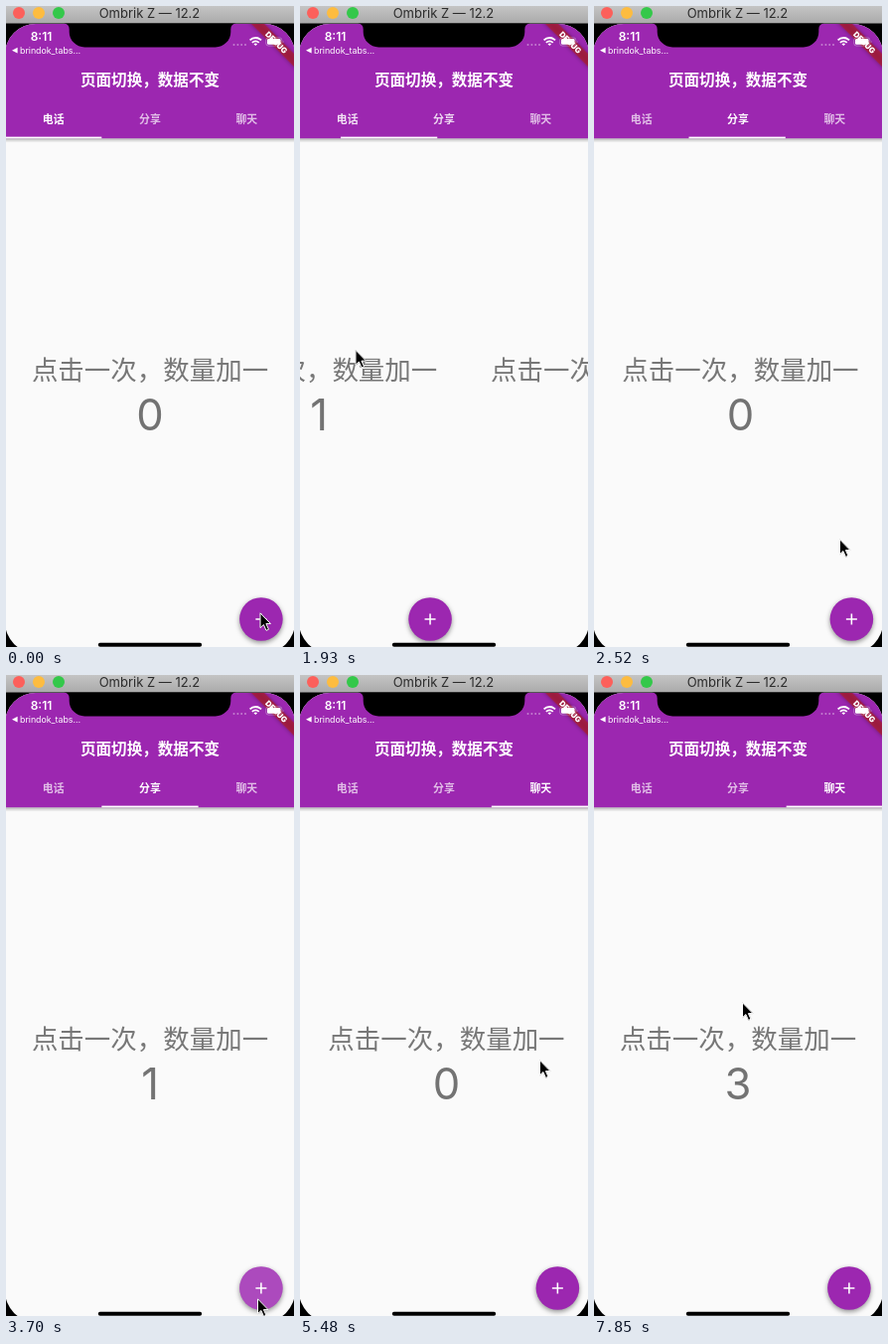
These frames come from a looping animation (290x645 px, 7.99 s). An HTML page:

```html
<!DOCTYPE html>
<html lang="zh">
<head>
<meta charset="utf-8">
<title>Tabs with kept counters</title>
<style>
  html, body { margin: 0; width: 100%; height: 100%; overflow: hidden; background: #000; }
  svg { display: block; width: 100%; height: 100%; }
  text { font-family: Inter, "Noto Sans CJK SC", "Noto Sans CJK", sans-serif; text-anchor: middle; }
  .cjk { font-family: "Noto Sans CJK SC", "Noto Sans CJK", sans-serif; }
  .white { fill: #fff; }
  .bar { font-size: 15.57px; font-weight: 700; }
  .tab { font-size: 10.9px; font-weight: 700; }
  .hint { font-size: 26.48px; fill: #777; }
  .count { font-size: 43.6px; fill: #737373; }
  .fab { filter: drop-shadow(0 2.6px 2.8px rgba(0, 0, 0, .42)); }
</style>
</head>
<body>
<svg viewBox="0 0 290 645">
  <defs>
    <linearGradient id="chrome" x2="0" y2="1">
      <stop stop-color="#c4c4c4"/><stop offset="1" stop-color="#aaa"/>
    </linearGradient>
    <linearGradient id="shade" x2="0" y2="1">
      <stop stop-opacity=".3"/><stop offset=".5" stop-opacity=".12"/><stop offset="1" stop-opacity="0"/>
    </linearGradient>
    <clipPath id="screen"><rect x="-1" y="18" width="292" height="633" rx="31"/></clipPath>
    <g id="button">
      <circle class="fab" cx="256.9" cy="617" r="21.8" fill="#9c27b0"/>
      <path d="M251.4 617h11M256.9 611.5v11" stroke="#fff" stroke-width="1.56"/>
    </g>
  </defs>

  <rect width="290" height="17.5" fill="url(#chrome)"/>
  <circle cx="13" cy="7" r="6" fill="#fc605b"/>
  <circle cx="33" cy="7" r="6" fill="#fdbc40"/>
  <circle cx="53" cy="7" r="6" fill="#34c84a"/>
  <text x="144.5" y="12" font-size="13" fill="#2c2c2c">Ombrik Z — 12.2</text>

  <g clip-path="url(#screen)">
    <rect y="18" width="290" height="633" fill="#fafafa"/>
    <g id="pages"></g>

    <rect y="133.2" width="290" height="4.5" fill="url(#shade)"/>
    <rect y="18" width="290" height="115.2" fill="#9c27b0"/>
    <text class="cjk white bar" x="145" y="79.8">页面切换，数据不变</text>
    <rect id="ripple" x="193.7" y="96" width="97.3" height="37.2" fill="#fff" opacity="0"/>
    <g id="tabs"></g>
    <rect id="line" y="131.6" width="97.3" height="1.6" fill="#fff"/>

    <g transform="translate(291 18) rotate(45)">
      <rect x="-45" y="21.8" width="90" height="9.34" fill="#b71c1c" fill-opacity=".63"
            style="filter: drop-shadow(0 0 2px rgba(0, 0, 0, .5))"/>
      <text class="white" y="29.3" font-size="7.9" font-weight="900">DEBUG</text>
    </g>

    <text class="white" x="35.5" y="34.6" font-size="12" font-weight="600">8:11</text>
    <path d="M6 44.7l5.6-2.9v5.8z" fill="#fff"/>
    <text class="white" x="14" y="47.9" font-size="8.8" style="text-anchor: start">brindok_tabs…</text>
    <path d="M229.5 39h.01M233.4 39h.01M237.2 39h.01M241 39h.01"
          stroke="#fff" stroke-opacity=".4" stroke-width="2" stroke-linecap="round"/>
    <g fill="none" stroke="#fff" stroke-width="1.8">
      <path d="M245.6 34.4a8 8 0 0 1 11.4 0M247.9 36.8a4.8 4.8 0 0 1 6.8 0"/>
      <path d="M249.5 38.3a2.6 2.6 0 0 1 3.6 0l-1.8 1.8z" fill="#fff" stroke="none"/>
    </g>
    <rect x="261.8" y="31.8" width="16" height="8.2" rx="2.4" fill="none" stroke="#fff" stroke-opacity=".4" stroke-width=".8"/>
    <rect x="263" y="33" width="13.6" height="5.8" rx="1.4" fill="#fff"/>
    <path d="M278.9 34.5q1.4 1.4 0 2.8z" fill="#fff" fill-opacity=".45"/>
  </g>

  <path d="M58.2 17.5q5.5.5 5.5 6v2.4a15.5 15.5 0 0 0 15.5 15.5h131.6a15.5 15.5 0 0 0 15.5-15.5v-2.4q0-5.5 5.5-6z"/>
  <rect x="92.8" y="640.8" width="104.4" height="3.9" rx="1.95"/>

  <path id="cursor" d="M.5 .8v14.9l3.4-3.2 2.6 5.9 2.5-1.1-2.6-5.7h4.6z"
        stroke="#fff" stroke-width="1" stroke-linejoin="round"
        style="filter: drop-shadow(0 .6px .6px rgba(0, 0, 0, .35))"/>
</svg>

<script>
// The screen is slightly wider than the stage and starts at LEFT.
const LOOP = 7990, STEP = 148.1, WIDTH = 292, LEFT = -1, TAB = WIDTH / 3;
const $ = id => document.getElementById(id);

// All times below are counted in screen refreshes of STEP ms.
const scroll = [[10, 0], [11, .09], [12, .26], [13, .431], [14, .66], [15, .86], [16, .965],
  [17, .9915], [18, 1], [35, 1], [36, 1.7], [37, 1.9915], [38, 2]];

const pointer = [[0, 255.5, 610], [1, 255, 610], [5, 255, 610], [6, 205, 400], [7, 129, 217],
  [8, 129, 217], [9, 165, 300], [10, 190, 345], [13, 55.5, 345.5], [14, 28, 346], [15, 70, 390],
  [17, 247, 536], [21, 253, 627], [27, 253, 627], [31, 135, 330], [34, 257, 112],
  [35, 257, 112], [36, 252, 200], [37, 241, 387], [41, 254, 629], [51, 254, 629], [53, 149, 329]];

const taps = [
  { page: 0, at: 3, fade: 1 },
  { page: 1, at: 25, fade: 1 },
  { page: 2, at: 43, fade: 2 },
  { page: 2, at: 47, fade: 1 },
  { page: 2, at: 51, fade: 1 }
];

function sample(track, t, col = 1) {
  const next = track.findIndex(key => key[0] > t);
  if (next < 0) return track[track.length - 1][col];
  if (next === 0) return track[0][col];
  const a = track[next - 1], b = track[next];
  return a[col] + (b[col] - a[col]) * (t - a[0]) / (b[0] - a[0]);
}

$("pages").innerHTML = [0, 1, 2].map(i => `
  <g transform="translate(${i * WIDTH})">
    <text class="cjk hint" x="145" y="376">点击一次，数量加一</text>
    <text class="count" x="145" y="426.6">0</text>
    <use href="#button"/>
    <circle class="glow" cx="256.9" cy="617" r="21.8" fill="#fff" opacity="0"/>
  </g>`).join("");
$("tabs").innerHTML = ["电话", "分享", "聊天"].map((name, i) =>
  `<text class="cjk white tab" x="${LEFT + (i + .5) * TAB}" y="117.8">${name}</text>`).join("");

const counts = document.querySelectorAll(".count");
const glows = document.querySelectorAll(".glow");
const tabs = document.querySelectorAll(".tab");

function draw(t) {
  const page = sample(scroll, t);
  $("pages").setAttribute("transform", `translate(${-page * WIDTH})`);
  $("line").setAttribute("x", LEFT + page * TAB);
  $("ripple").setAttribute("opacity", t === 36 ? .12 : 0);
  $("cursor").setAttribute("transform", `translate(${sample(pointer, t)} ${sample(pointer, t, 2)})`);

  for (let i = 0; i < 3; i++) {
    const done = taps.filter(tap => tap.page === i && tap.at <= t);
    const last = done[done.length - 1];
    const glow = last ? Math.max(0, 1 - (t - last.at) / last.fade) : 0;
    counts[i].textContent = done.length;
    glows[i].setAttribute("opacity", .16 * glow);
    tabs[i].setAttribute("opacity", .7 + .3 * Math.max(0, 1 - Math.abs(page - i)));
  }
}

let shown = -1;
const start = performance.now();
function tick() {
  const t = Math.floor(((performance.now() - start) % LOOP + 5) / STEP);
  if (t !== shown) draw(shown = Math.min(t, 53));
  requestAnimationFrame(tick);
}
tick();
</script>
</body>
</html>
```
